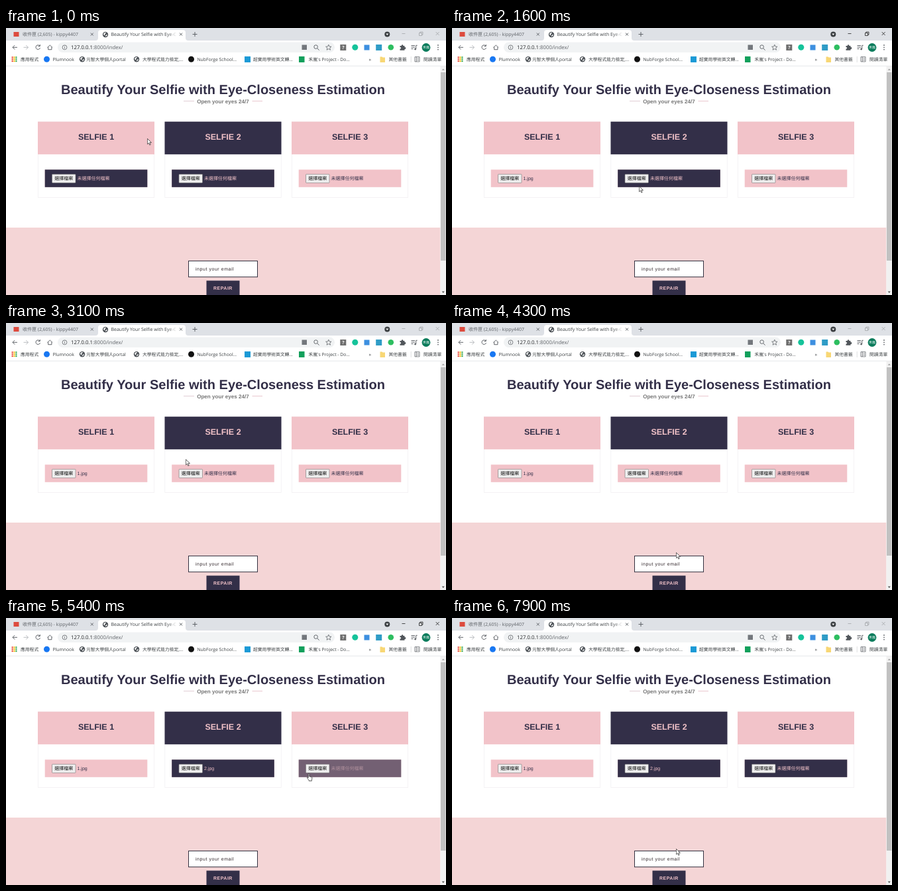
An HTML page that plays this animation: 664x404 px, repeating every 8 s.

```html
<!DOCTYPE html>
<html lang="zh-Hant">
<head>
<meta charset="utf-8">
<title>Selfie upload</title>
<style>
html, body { margin: 0; width: 100%; height: 100%; overflow: hidden; background: #fff; }
svg { display: block; width: 664px; height: 404px; }
text { text-rendering: geometricPrecision; }
.ui { font: 7px "Open Sans", "Noto Sans CJK TC", "Noto Sans CJK", sans-serif; fill: #3c4043; }
.page { font: 7px "Liberation Sans", "Noto Sans CJK TC", "Noto Sans CJK", sans-serif; }
.b { font-weight: bold; }
.mid { text-anchor: middle; }
.line { fill: none; stroke: #5f6368; stroke-width: 1; }

/* 1.25% is one 100 ms step */
.win, .dark, .before, .after, #cursor, #arrow, #hand { animation: 8s step-end infinite; }
.win { animation-name: focus; fill: none; stroke-width: .8; }
.dark1 { animation-name: dark1; }
.dark2 { animation-name: dark2; }
.dark3 { animation-name: dark3; }
.before1 { animation-name: until1; }
.after1 { animation-name: from1; }
.before2 { animation-name: until2; }
.after2 { animation-name: from2; }
#cursor { animation-name: move; }
#arrow { animation-name: arrow; }
#hand { animation-name: hand; }

@keyframes focus {
  0%, 27.5%, 71.25%, 100% { stroke: #a4a6aa; }
  15%, 56.25% { stroke: #222; }
}
@keyframes dark1 {
  0% { opacity: 1; }
  16.25% { opacity: 1; animation-timing-function: steps(3); }
  20%, 100% { opacity: 0; }
}
@keyframes dark2 {
  0% { opacity: 1; }
  20% { opacity: 1; animation-timing-function: steps(3); }
  23.75% { opacity: 0; }
  57.5% { opacity: 0; animation-timing-function: steps(3); }
  61.25%, 100% { opacity: 1; }
}
@keyframes dark3 {
  0% { opacity: 0; }
  65% { opacity: 0; animation-timing-function: steps(3); }
  68.75%, 100% { opacity: 1; }
}
@keyframes until1 { 0% { opacity: 1; } 15%, 100% { opacity: 0; } }
@keyframes from1 { 0% { opacity: 0; } 15%, 100% { opacity: 1; } }
@keyframes until2 { 0% { opacity: 1; } 56.25%, 100% { opacity: 0; } }
@keyframes from2 { 0% { opacity: 0; } 56.25%, 100% { opacity: 1; } }
@keyframes arrow { 0%, 68.75%, 100% { opacity: 1; } 66.25% { opacity: 0; } }
@keyframes hand { 0%, 68.75%, 100% { opacity: 0; } 66.25% { opacity: 1; } }
@keyframes move {
  0% { transform: translate(213px, 167px); }
  1.25% { transform: translate(213px, 175px); }
  2.5% { transform: translate(213px, 175px); animation-timing-function: steps(4); }
  7.5% { transform: translate(285px, 270px); animation-timing-function: steps(2); }
  10% { transform: translate(343px, 344px); }
  11.25% { transform: translate(338px, 348px); }
  13.75% { transform: translate(338px, 348px); animation-timing-function: steps(2); }
  16.25% { transform: translate(316px, 312px); animation-timing-function: steps(3); }
  20% { transform: translate(282px, 239px); animation-timing-function: steps(3); }
  23.75% { transform: translate(277px, 231px); }
  25% { transform: translate(277px, 231px); animation-timing-function: steps(2); }
  27.5% { transform: translate(277px, 236px); animation-timing-function: steps(2); }
  30% { transform: translate(276px, 231px); }
  35% { transform: translate(276px, 231px); animation-timing-function: steps(3); }
  38.75% { transform: translate(271px, 206px); animation-timing-function: steps(3); }
  42.5% { transform: translate(264px, 188px); }
  45% { transform: translate(264px, 188px); animation-timing-function: steps(4); }
  50% { transform: translate(310px, 290px); animation-timing-function: steps(3); }
  53.75% { transform: translate(338px, 347px); }
  56.25% { transform: translate(338px, 347px); animation-timing-function: steps(4); }
  61.25% { transform: translate(395px, 299px); animation-timing-function: steps(3); }
  65% { transform: translate(452px, 240px); animation-timing-function: steps(2); }
  67.5% { transform: translate(457px, 235px); }
  68.75% { transform: translate(457px, 231px); }
  72.5% { transform: translate(457px, 229px); }
  77.5% { transform: translate(457px, 229px); animation-timing-function: steps(2); }
  80% { transform: translate(375px, 249px); }
  81.25% { transform: translate(323px, 242px); animation-timing-function: steps(3); }
  85% { transform: translate(241px, 210px); }
  86.25% { transform: translate(234px, 206px); }
  88.75% { transform: translate(237px, 203px); }
  90% { transform: translate(239px, 201px); }
  92.5% { transform: translate(239px, 201px); animation-timing-function: steps(3); }
  96.25% { transform: translate(308px, 302px); animation-timing-function: steps(2); }
  98.75%, 100% { transform: translate(338px, 349px); }
}
</style>
</head>
<body>
<svg id="stage" viewBox="0 0 664 404" xmlns="http://www.w3.org/2000/svg"></svg>
<script>
const PINK = '#f2c3c9', DARK = '#332f48';

const rect = (x, y, w, h, fill, more = '') =>
  `<rect x="${x}" y="${y}" width="${w}" height="${h}" fill="${fill}" ${more}/>`;
const dot = (x, y, r, fill) => `<circle cx="${x}" cy="${y}" r="${r}" fill="${fill}"/>`;
const text = (x, y, str, more = '') => `<text x="${x}" y="${y}" ${more}>${str}</text>`;
const line = (d, more = '') => `<path class="line" d="${d}" ${more}/>`;
const globe = (x, y) => dot(x, y, 4.2, '#50555a') +
  `<path d="M${x - 3} ${y - 1}q2 -3 4 -2q-1 2 -2 2q1 2 -1 2zM${x} ${y + 3}q0 -3 3 -3q0 2 -3 3z" fill="#fff"/>`;

function tabs() {
  return `<defs><linearGradient id="fade1"><stop stop-color="#dee1e6" stop-opacity="0"/><stop offset="1" stop-color="#dee1e6"/></linearGradient>
    <linearGradient id="fade2"><stop stop-color="#fff" stop-opacity="0"/><stop offset="1" stop-color="#fff"/></linearGradient></defs>` +
    rect(0, 0, 664, 19, '#dee1e6') +
    rect(11.5, 6, 8, 7, '#dd4b3e') +
    text(25, 12.4, '收件匣 (2,605) - kippy4407', 'fill="#5f6368"') +
    rect(108, 4, 15, 12, 'url(#fade1)') + rect(123, 4, 4, 12, '#dee1e6') +
    line('M127.8 7.5l4 4m0 -4l-4 4') +
    '<path d="M135 19q4 0 4 -4v-8q0 -4 4 -4h124q4 0 4 4v8q0 4 4 4z" fill="#fff"/>' +
    globe(150, 10) +
    text(158.5, 12.4, 'Beautify Your Selfie with Eye-C') +
    rect(243, 4, 15, 12, 'url(#fade2)') +
    line('M262 7.5l4 4m0 -4l-4 4') + line('M281.5 9.5h7m-3.5 -3.5v7') +
    dot(575.3, 9.5, 4, '#3c4043') + '<path d="M573.3 8.5h4l-2 2.6z" fill="#fff"/>' +
    '<path class="win" d="M597.5 8.5h5M623.5 7.5h4v4h-4zM624.8 7.5v-1.5h4.2v4.2h-1.5M648.7 6l5 5m0 -5l-5 5"/>';
}

function toolbar() {
  return rect(0, 19, 664, 38, '#fff') +
    line('M17 29.3h-7m3.2 -3.2l-3.2 3.2l3.2 3.2') +
    line('M26.5 29.3h7m-3.2 -3.2l3.2 3.2l-3.2 3.2', 'style="stroke:#b9bcc0"') +
    line('M51 27.2a3.3 3.3 0 1 0 .5 2.8M51.3 25v2.6h-2.7') +
    line('M62.5 29.5l3.8 -3.5l3.8 3.5M63.7 29v3.7h5.2v-3.7') +
    rect(78, 21.5, 418, 15.5, '#f1f3f4', 'rx="7.7"') +
    '<circle class="line" cx="88.5" cy="29.3" r="3.4" style="stroke-width:.8"/>' + line('M88.5 28.8v2.4M88.5 27.2v.9', 'style="stroke-width:.8"') +
    text(98, 32.1, '127.0.0.1<tspan fill="#5f6368">:8000/index/</tspan>', 'font-size="7.8" fill="#202124"') +
    rect(446.5, 25.5, 7.5, 7.5, '#73777c') +
    line('M470 31l2.6 2.6') + '<circle class="line" cx="467.6" cy="28.6" r="2.8"/>' +
    line('M486.8 25.2l1.2 2.8l3 .2l-2.3 2l.8 3l-2.7 -1.6l-2.7 1.6l.8 -3l-2.3 -2l3 -.2z', 'style="stroke-width:.8"') +
    rect(504.3, 25, 9, 9, '#6e6e6e') + text(508.8, 32.3, '?', 'class="mid b" style="fill:#fff"') +
    dot(526.8, 29.3, 4.5, '#15c39a') + rect(540.5, 25.5, 8, 8, '#3d8fe0') +
    rect(558.2, 25, 9, 9, '#2f9cc6') + dot(580.8, 29.3, 4.3, '#2dbe60') +
    '<path d="M594.5 27h2.4a1.3 1.3 0 1 1 2.4 0h2.2v2.3a1.3 1.3 0 1 1 0 2.4v2h-7v-2.2a1.2 1.2 0 1 0 0 -2.3z" fill="#50555a"/>' +
    line('M611.5 26.5h5.5M611.5 29h5.5M611.5 31.5h3M618.7 32v-5.7h2') + dot(617.6, 32, 1.4, '#5f6368') +
    dot(634, 29.5, 6.4, '#0b7c5c') + text(634, 31.4, '禾嵐', 'class="mid" font-size="5" style="fill:#fff"') +
    [26, 29.3, 32.6].map(y => dot(652, y, .9, '#5f6368')).join('');
}

function bookmarks() {
  const hues = ['#ea4335', '#fbbc04', '#34a853', '#4285f4'];
  let apps = '';
  for (let i = 0; i < 9; i++)
    apps += rect(8.6 + i % 3 * 2.9, 43.3 + Math.floor(i / 3) * 2.9, 2.1, 2.1, hues[(i + Math.floor(i / 3)) % 4]);
  const label = (x, str) => text(x, 50, str, 'font-size="6.8"');
  return apps + label(22, '應用程式') +
    dot(61.5, 47.3, 4.5, '#1877f2') + label(70.5, 'Plumnook') +
    globe(115, 47.3) + label(121, '元智大學個人portal') +
    globe(197, 47.3) + label(206, '大學程式能力檢定,...') +
    dot(279.5, 47.3, 4.5, '#111') + label(288.5, 'NubForge School...') +
    rect(360, 43, 9, 9, '#1b9ad6') + label(373, '超實用學術英文轉...') +
    rect(442, 43, 8.5, 9, '#12a05c') + label(456.5, '禾嵐\'s Project - Do...') +
    text(547.5, 49.6, '»') +
    '<path d="M564.5 43.5h3l1 1h3.5v7.5h-7.5z" fill="#f8d775"/>' + label(577.5, '其他書籤') +
    rect(610.8, 43, .7, 9, '#cfd1d4') +
    line('M617 43.7h7v7.2h-7zM619.3 43.7v7.2M620.5 46h2.5M620.5 48.5h2.5', 'style="stroke-width:.8"') +
    label(630, '閱讀清單') + rect(0, 57, 664, .7, '#dcdee1');
}

function card(n, x) {
  const [bg, ink] = n === 2 ? [DARK, PINK] : [PINK, DARK];
  const empty = '未選擇任何檔案';
  const name = color => n === 3 ? text(x + 59.5, 230, empty, `fill="${color}"`) :
    text(x + 59.5, 230, empty, `class="before before${n}" fill="${color}"`) +
    text(x + 59.5, 230, n + '.jpg', `class="after after${n}" fill="${color}"`);
  const field = (fill, color) => rect(x + 10.7, 214.3, 154.6, 26.5, fill) + name(color);
  return rect(x + .3, 142, 175.4, 114.5, '#fff', 'stroke="#efedf0" stroke-width=".7"') +
    rect(x, 141.7, 176, 49.5, bg) +
    text(x + 88, 169, 'SELFIE ' + n, `class="mid b" font-size="12.5" fill="${ink}"`) +
    field(PINK, DARK) +
    `<g class="dark dark${n}">${field(DARK, PINK)}</g>` +
    rect(x + 21.5, 221.3, 35.5, 13, '#efefef', 'stroke="#767676" stroke-width=".6" rx=".8"') +
    text(x + 39.3, 230.1, '選擇檔案', 'class="mid" fill="#111"');
}

function page() {
  return text(327.5, 100, 'Beautify Your Selfie with Eye-Closeness Estimation', `class="mid b" font-size="20.04" fill="${DARK}"`) +
    text(327.5, 113.6, 'Open your eyes 24/7', 'class="mid b" font-size="8.1" fill="#777"') +
    rect(268, 110.3, 16, .8, '#d9bfc8') + rect(371.5, 110.3, 15.5, .8, '#e3b7c0') +
    card(1, 48) + card(2, 239.5) + card(3, 431) +
    rect(0, 302, 655.5, 102, '#f4d5d6') +
    rect(275.5, 352.5, 104, 24.2, '#fff', 'stroke="#33303f" stroke-width="1"') +
    text(286, 367.2, 'input your email', 'letter-spacing=".55" fill="#33282c"') +
    rect(302.5, 382.3, 50, 22, DARK) +
    text(313, 396, 'REPAIR', `class="b" letter-spacing=".5" fill="${PINK}"`);
}

function scrollbar() {
  return rect(655.5, 57.7, 8.5, 346.3, '#f1f1f1') + rect(656, 67, 7.5, 285, '#c1c1c1') +
    '<path d="M657.8 64h4l-2 -2.4z" fill="#a3a3a3"/><path d="M657.8 398.5h4l-2 2.4z" fill="#505050"/>';
}

const cursor = `<g id="cursor" fill="#fff" stroke="#222" stroke-width=".7" stroke-linejoin="round">
  <path id="arrow" d="M.4 .4v8.4l2 -1.8l1.4 3.1l1.4 -.6l-1.4 -3.1h2.7z"/>
  <path id="hand" d="M-.8 1.2q0 -1 .8 -1t.8 1v3.6l3 .7q1.2 .3 1.1 1.6l-.5 3.2v1.2h-4.3v-1l-2.6 -3.4q-.5 -1 .4 -1.2l1.3 1z"/>
</g>`;

document.getElementById('stage').innerHTML =
  `<g class="page">${page()}</g><g class="ui">${tabs()}${toolbar()}${bookmarks()}</g>` + scrollbar() + cursor;
</script>
</body>
</html>
```
